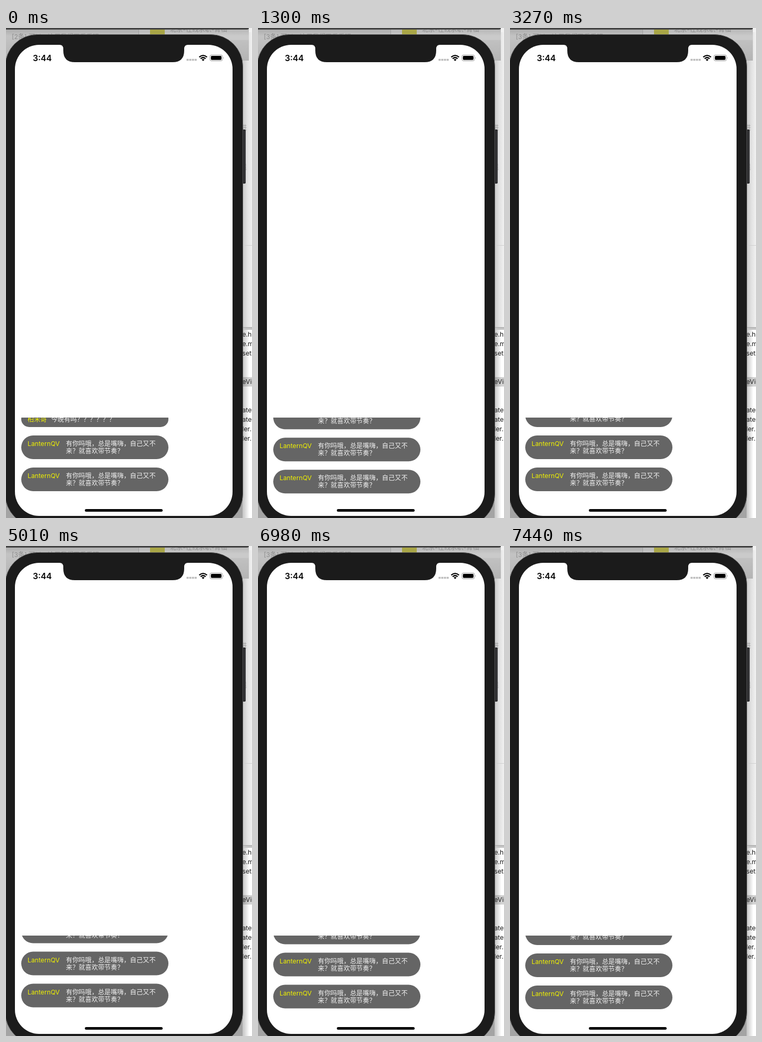
Recreate the animation shown at these times as an HTML page. Size 468x932 px, loop 7.86 s.

```html
<!DOCTYPE html>
<html lang="zh-CN">
<head>
<meta charset="utf-8">
<style>
  html, body { margin: 0; width: 100%; height: 100%; overflow: hidden; background: #fff; }
  svg { display: block; width: 468px; height: 932px; font: 12.2px Inter, "Noto Sans CJK SC", "Noto Sans CJK", sans-serif; }
  .name { fill: #eff000; }
  .chat { fill: #f1f1f1; }
  .faint { fill: #8d8d8d; }
</style>
</head>
<body>
<svg viewBox="0 0 468 932">
  <defs>
    <linearGradient id="side">
      <stop offset="0" stop-color="#c6c6c6"/>
      <stop offset=".55" stop-color="#e2e2e2"/>
      <stop offset="1" stop-color="#f1f1f1"/>
    </linearGradient>
    <linearGradient id="shade">
      <stop offset="0" stop-color="#000" stop-opacity=".25"/>
      <stop offset="1" stop-color="#000" stop-opacity="0"/>
    </linearGradient>
    <linearGradient id="panel" x2="0" y2="1">
      <stop offset="0" stop-color="#a9a9a9"/>
      <stop offset=".25" stop-color="#c3c3c3"/>
      <stop offset="1" stop-color="#b4b4b4"/>
    </linearGradient>
    <clipPath id="list"><rect x="17" y="741" width="414" height="150"/></clipPath>
    <clipPath id="below"><rect y="3" width="468" height="40"/></clipPath>
  </defs>

  <!-- desktop behind the phone -->
  <rect x="440" width="28" height="570" fill="#f2f2f2"/>
  <rect x="449" y="8" width="19" height="562" fill="url(#side)"/>
  <rect width="462" height="62" fill="url(#panel)"/>
  <rect x="252" y="3" width="210" height="20" fill="#fff" opacity=".12"/>
  <path d="M252.5 3V14" stroke="#a0a0a0"/>
  <g class="faint" clip-path="url(#below)">
    <text id="unread" x="11" y="21"></text>
    <text x="312" y="7">北京-在线求职-青柚</text>
    <rect x="274" y="0" width="28" height="14" fill="#a9a647"/>
  </g>
  <path d="M0 0H462Q462 3 458 3H0Z" fill="#444"/>
  <g class="faint" opacity=".7">
    <text x="446" y="194">进</text>
    <text x="446" y="269">迷</text>
  </g>
  <path d="M449 413.5H468" stroke="#cfcfcf"/>
  <rect x="440" y="569" width="28" height="5" fill="#c4c4c4"/>
  <path d="M449 569.5H468" stroke="#a5a5a5"/>
  <rect x="440" y="574" width="28" height="358" fill="#fff"/>
  <rect x="440" y="664" width="28" height="18" fill="#d4d4d4"/>
  <rect x="449" y="574" width="14" height="358" fill="url(#shade)"/>
  <path d="M0 880V932H30ZM450 870V932H420Z" fill="#a4a4a4"/>
  <g id="files" fill="#1c1c1c"></g>

  <!-- phone -->
  <rect x="446" y="193" width="10" height="103" rx="2" fill="#2b2b2d"/>
  <path d="M454.5 196V293" stroke="#48484a"/>
  <rect x="-1.5" y="12.5" width="452" height="935" rx="61" fill="#1b1b1b" stroke="#555"/>
  <rect x="17" y="32" width="414" height="896" rx="46" fill="#fff"/>
  <path d="M102 31V32Q109 32 109 40V43Q109 65 131 65H317Q339 65 339 43V40Q339 32 346 32V31Z" fill="#1b1b1b"/>
  <text x="51" y="62.6" font-size="15.8" font-weight="600">3:44</text>
  <path d="M343.5 60.5H363" stroke="#bcbcbc" stroke-width="3.6" stroke-dasharray="4 1.1"/>
  <g fill="none" stroke="#000" stroke-width="2.2">
    <path d="M367.6 55.4Q375 48.8 382.4 55.4M370.3 58.3Q375 54.2 379.7 58.3"/>
  </g>
  <path d="M372.3 60.1Q375 57.9 377.7 60.1L375 62.9Z"/>
  <rect x="387.9" y="51.2" width="24" height="11.4" rx="3.2" fill="none" stroke="#9b9b9b"/>
  <rect x="389.8" y="53" width="20.2" height="7.8" rx="1.8"/>
  <path d="M413 55Q414.8 56.9 413 58.8Z" fill="#9b9b9b"/>
  <g clip-path="url(#list)"><g id="rows"></g></g>
  <rect x="150" y="915" width="148" height="5" rx="2.5"/>
</svg>
<script>
  const LOOP = 7860, PITCH = 61, SCROLL_MS = 275, STEP = 57;
  // start of each scroll, and how far the scroll clock has already run by then
  const bursts = [[1020, 0], [3040, 42], [5010, 42], [6980, 27]];
  const $ = id => document.getElementById(id);

  const row = (top, name, textX, lines) => {
    const height = 16 + 14 * lines.length + (lines.length > 1 ? 1 : 0);
    return `<rect x="29" y="${top}" width="280" height="${height}" rx="${height / 2}" fill="#656565"/>
      <text class="name" x="41" y="${top + 20}">${name}</text>` +
      lines.map((line, i) => `<text class="chat" x="${textX}" y="${top + 20 + 14 * i}">${line}</text>`).join('');
  };

  let rows = row(729, '柏禾哥', 86, ['今晚有吗？？？？？？']);
  for (let i = 0; i < 2 + bursts.length; i++) {
    rows += row(775 + PITCH * i, 'LanternQV', 114, ['有你吗哦，总是嘴嗨，自己又不', '来？就喜欢带节奏？']);
  }
  $('rows').innerHTML = rows;

  const files = [[583, 'e.h'], [601, 'e.m'], [619, 'sets'], [673, 'eVie'], [727, 'ate'], [745, 'ate'], [763, 'ler.'], [781, 'ler.']];
  $('files').innerHTML = files.map(([y, text]) => `<text x="449.5" y="${y + 4}">${text}</text>`).join('');

  const ease = x => (1 - Math.cos(Math.PI * Math.min(x, 1))) / 2;

  function scrollAt(t) {
    let offset = 0;
    for (const [start, lead] of bursts) {
      if (t < start) break;
      const held = Math.floor((t - start) / STEP) * STEP;
      offset += PITCH * ease((held + lead) / SCROLL_MS);
    }
    return offset;
  }

  function draw(now) {
    const t = now % LOOP;
    $('rows').setAttribute('transform', `translate(0 ${-scrollAt(t)})`);
    $('unread').textContent = `[${t < bursts[0][0] ? 2 : 3}条] 可以，这周我们再看看吧`;
    requestAnimationFrame(draw);
  }
  draw(performance.now());
</script>
</body>
</html>
```
